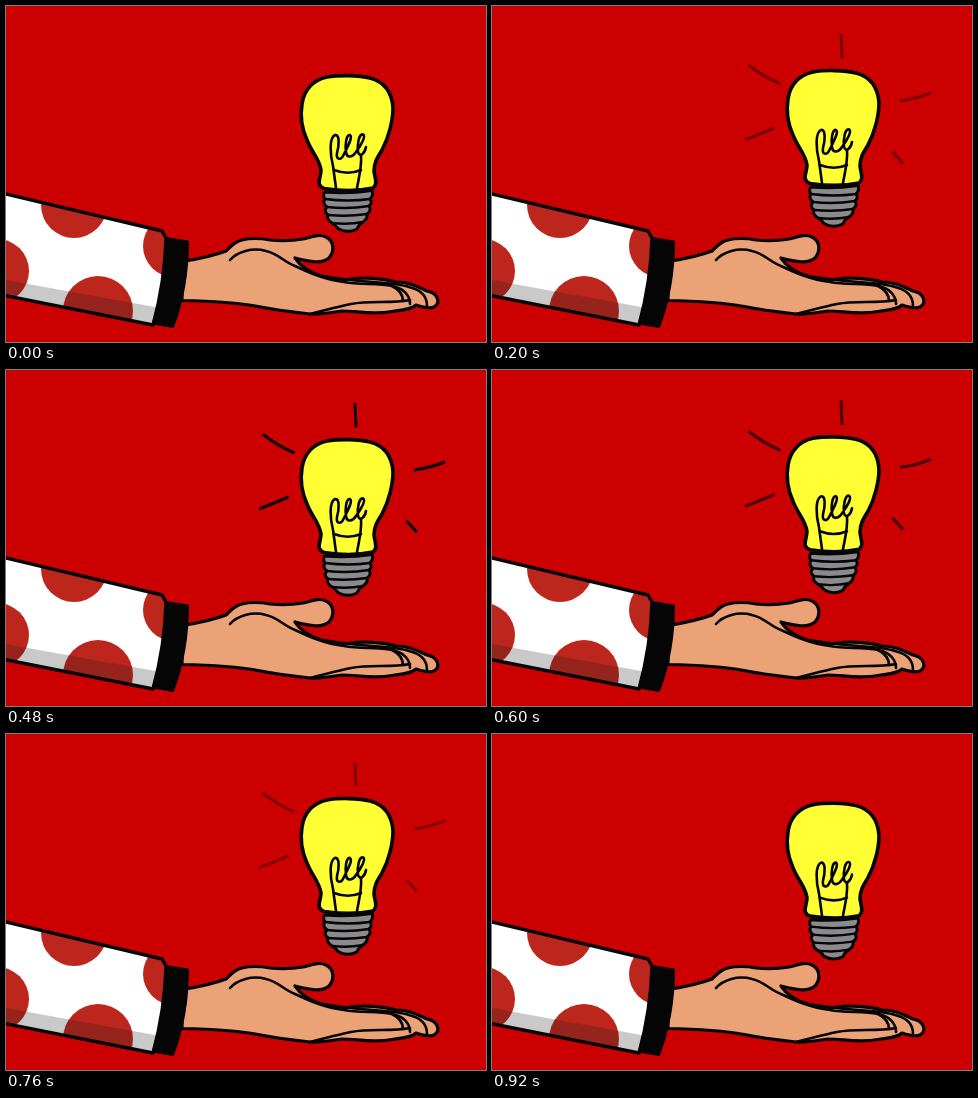
An HTML page with a canvas for the animation above (0.96 s loop, 480 px wide and 336 px high).

```html
<!DOCTYPE html>
<html lang="en">
<head>
<meta charset="utf-8">
<title>Bright idea</title>
<style>
html, body { margin: 0; width: 480px; height: 336px; overflow: hidden; background: #c00; }
canvas { display: block; }
</style>
</head>
<body>
<canvas id="stage" width="480" height="336"></canvas>
<script>
const ctx = document.getElementById('stage').getContext('2d');
const LOOP = 960, STEP = 40, LIFT = 5.4;
const INK = '#050505', SKIN = '#eba276', DOT = '#bc261c', GLASS = '#ffff33', METAL = '#8b8b8d';

const hand = new Path2D(`M176 255.5 C192 253 207 250 220 245 C225 240 229 235.5 236 234
  C246 231.5 256 232.5 264 234 C275 235 288 234.5 297 233 C306 231 312 227.5 320 231
  C328 235 329 245 323 252 C316 258 304 256 289 252 C295 261 304 267 316 270
  C328 272 335 274 342 273.5 C357 271 376 272 390 276 C404 276 412 281 421 285
  C432 287 435 297 428 301 C423 303 416 301 410 299 C405 304 395 304 386 305.5
  C367 309 351 305 336 305 C324 307 314 308.5 304 308 C286 306 269 304 252 300.5
  C228 296 203 295 176 294.5Z`);
const handLines = [
  'M224 254 C231 246 246 241 260 245 C273 248 278 256 289 260 C304 267 319 274 338 276 C354 279 371 277 386 280 C397 282 404 289 404 298',
  'M342 273.5 C364 277 389 276 403 281 C416 284 421 291 421 300',
  'M304 308 C317 305 330 301 345 298 C365 294 384 298 404 294',
  'M386 280 C394 284 397 289 397 295'
].map(d => new Path2D(d));

const sleeve = new Path2D('M-6 186.5 L156 225 L160 232 Q159 275 147 319 L-6 288.5Z');
const shade = new Path2D('M-6 273 L165 304 L150 325 L-6 295Z');
const cuff = new Path2D('M160 232 L182 235.5 Q182 282 167 321 L147 317.5 Q159 278 160 232Z');
const dots = [[68, 199, 33], [-9, 265, 32], [168, 240, 31], [92, 305, 35]];

const glass = new Path2D(`M318 182.5 C309 179 315 172 315 164 C313 152 306 147 301 134
  C296 123 294 110 296 98 C298 84 307 74 321 71 C332 69 353 69 364 72
  C379 76 386 87 387 102 C387 114 383 131 376 144 C371 152 368 157 368 165
  C369 173 372 178 367 182 C351 185.5 335 185 318 182.5Z`);
const filament = [
  `M330 182 L327 160 C324 148 323 132 329 129 C334 128 333 140 331 147
   C330 154 335 155 338 148 C342 140 347 131 344 129 C340 128 339 140 340 146
   C341 153 347 151 350 146 C356 138 360 130 357 128.5 C353 127 351 139 352 146
   C354 152 359 147 360 141`,
  'M355 149 C356 160 353 171 351 182',
  'M328 164 Q342 169.5 355 164'
].map(d => new Path2D(d));
const screw = new Path2D(`M319 186 Q342 188 366 184.5 Q368 189 364 193 Q367 197 363 200
  Q366 205 361 208 Q362 213 357 216 Q353 218 351 223 Q341 228 332 222.5
  Q330 219 326 217 Q320 213 322 209 Q317 205 321 201 Q316 197 319 193 Q316 189 319 186Z`);
const threads = new Path2D(`M319 193 Q342 196 364 193 M321 201 Q342 203.5 363 200
  M322 209 Q342 211 361 208 M326 217 Q342 219 357 216`);
const rays = new Path2D(`M349 33 L350 57.5 M256.5 64 Q271 75.5 288.5 83 M408 100
  Q424 98 439 92 M253 139 Q266 134 282.5 127 M400.5 150.5 L411 162.5`);

function fill(path, color) {
  ctx.fillStyle = color;
  ctx.fill(path);
}

function line(path, width) {
  ctx.strokeStyle = INK;
  ctx.lineWidth = width;
  ctx.stroke(path);
}

function drawArm() {
  fill(hand, SKIN);
  line(hand, 3.2);
  handLines.forEach(path => line(path, 2.6));

  ctx.save();
  ctx.clip(sleeve);
  fill(sleeve, '#fff');
  for (const [x, y, r] of dots) {
    const dot = new Path2D();
    dot.arc(x, y, r, 0, Math.PI * 2);
    fill(dot, DOT);
  }
  fill(shade, 'rgba(35, 31, 32, 0.24)');
  ctx.restore();
  line(sleeve, 3.4);
  fill(cuff, INK);
  line(cuff, 2);
}

function drawBulb() {
  fill(screw, METAL);
  line(screw, 3);
  line(threads, 2.4);
  fill(glass, GLASS);
  line(glass, 3.6);
  filament.forEach(path => line(path, 2.6));
}

function draw(now) {
  const time = Math.floor((now % LOOP) / STEP) * STEP;
  const phase = time / LOOP * Math.PI * 2;
  // The rays are fully gone on the last step of the loop.
  const glow = 1 - Math.abs(time * 2 / (LOOP - STEP) - 1);

  ctx.fillStyle = '#c00';
  ctx.fillRect(0, 0, 480, 336);
  ctx.lineCap = ctx.lineJoin = 'round';
  drawArm();

  ctx.save();
  ctx.translate(0, -LIFT * Math.sin(phase) ** 2);
  drawBulb();
  ctx.globalAlpha = glow;
  ctx.lineCap = 'butt';
  line(rays, 3);
  ctx.restore();
}

const start = performance.now();
function tick() {
  draw(performance.now() - start);
  requestAnimationFrame(tick);
}
tick();
</script>
</body>
</html>
```
